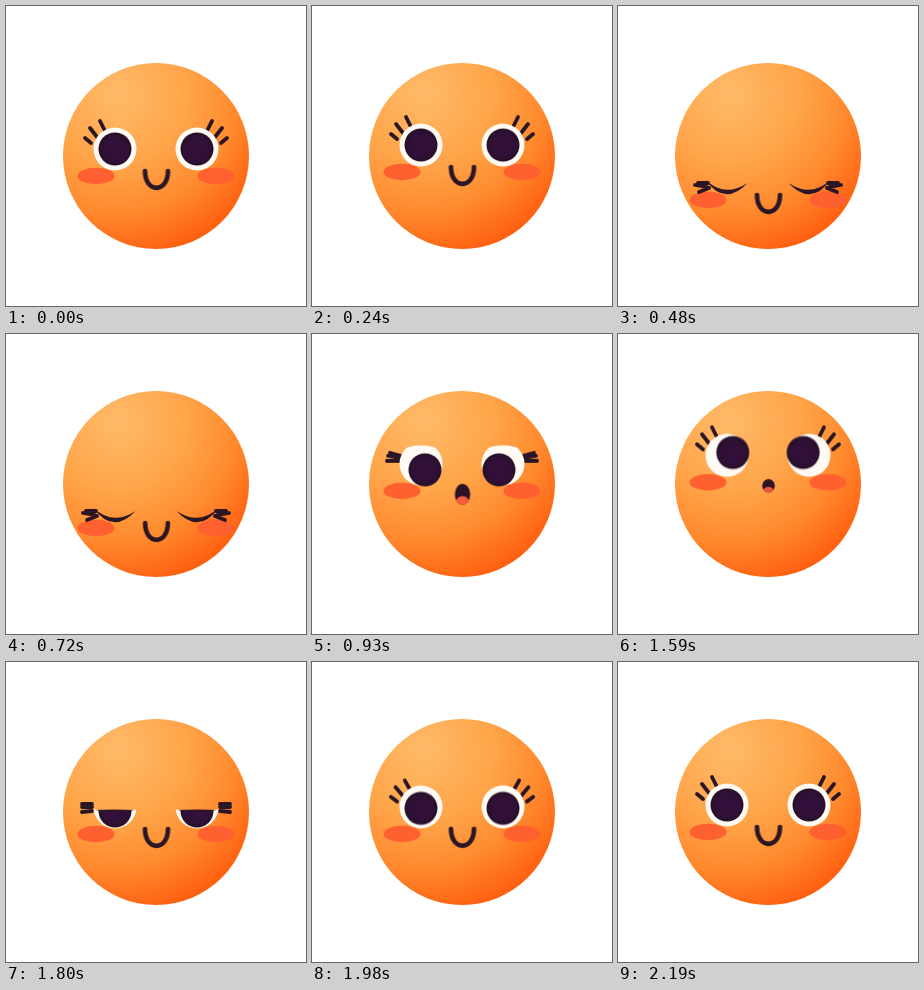
An HTML page that plays this animation: 300 px wide and 300 px high, repeating every 2.22 s.

```html
<!DOCTYPE html>
<html lang="en">
<head>
<meta charset="utf-8">
<title>Blinking orange face</title>
<style>
html, body { margin: 0; height: 100%; overflow: hidden; background: #fff; }
svg { display: block; width: 100vw; height: 100vh; }

.face, .pupil, .edge, .lid, .lash, .smile, .gasp, .tongue {
  animation: 2220ms ease-in-out infinite;
}
.face { animation-name: nod; }
.pupil { animation-name: look; fill: url(#iris); }
.edge { animation-name: blink; }
.lid { animation-name: lid; fill: #2b1626; }
.lash { fill: none; stroke: #2b1626; stroke-width: 3.8; stroke-linecap: round; animation-name: lash; }
.smile { fill: none; stroke: #2b1626; stroke-width: 4.6; stroke-linecap: round; animation-name: smile; }
.gasp { animation-name: gasp; }
.tongue { animation-name: tongue; }

@keyframes nod {
  0%, 100% { transform: translateY(0); }
  10.81% { transform: translateY(-4px); }
  21.62% { transform: translateY(24px); }
  33.8% { transform: translateY(24px); }
  41.89% { transform: translateY(-13px); animation-timing-function: ease-out; }
  47.3% { transform: translateY(-22.5px); }
  70.3% { transform: translateY(-22.5px); }
  81.08% { transform: translateY(2px); }
  87.8% { transform: translateY(2px); }
  95% { transform: translateY(0); }
}

@keyframes look {
  0%, 33.8%, 95%, 100% { transform: translate(0, 0); }
  41.89% { transform: translate(4px, 6px); }
  48% { transform: translate(6px, -3px); }
  70.3% { transform: translate(6px, -3px); }
  81.08% { transform: translate(0, 4px); }
}

/* Visible part of the eye, below the lid */
@keyframes blink {
  0%, 12.5%, 48%, 72%, 91%, 100% { d: path("M-24 -30 Q0 -30 24 -30 V32 H-24 Z"); }
  20.5%, 35.5% { d: path("M-24 12 Q0 44 24 12 V32 H-24 Z"); }
  41.89% { d: path("M-24 -13 Q0 -24 24 -13 V32 H-24 Z"); }
  81.08% { d: path("M-24 2 Q0 6 24 2 V32 H-24 Z"); }
}

@keyframes lid {
  0%, 15%, 48%, 75%, 87%, 100% { d: path("M-21 -8 Q-2 -34 20 -8 Q-2 -36 -21 -8 Z"); opacity: 0; }
  20.5%, 35.5% { d: path("M-21.5 7 Q-2 34 20.5 10 Q-2 25 -21.5 7 Z"); opacity: 1; }
  39.5% { d: path("M-21 -6 Q-2 -10 20 -6 Q-2 -13 -21 -6 Z"); opacity: 0; }
  81.08% { d: path("M-20 3 Q-2 6 20 3 Q-2 2 -20 3 Z"); opacity: 1; }
}

@keyframes lash {
  0%, 12.5%, 48%, 72%, 91%, 100% { d: path("M-30 -11 L-24 -6 M-25 -21 L-18 -12 M-15 -28 L-10 -18"); }
  20.5%, 35.5% { d: path("M-28 19 L-18 15 M-32 12 L-20 14 M-29 10 L-19 10"); }
  41.89% { d: path("M-34 -3 L-21 -3 M-33 -8 L-21 -6 M-31 -11 L-20 -8"); }
  81.08% { d: path("M-33 5 L-23 4 M-33 0 L-23 0 M-33 -3 L-23 -3"); }
}

@keyframes smile {
  0%, 32%, 76%, 100% { transform: scale(1); opacity: 1; }
  36.4% { transform: scale(.5, .8); opacity: 1; }
  37%, 72.5% { transform: scale(.5, .8); opacity: 0; }
  73% { transform: scale(.5, .8); opacity: 1; }
}

@keyframes gasp {
  0%, 36.4%, 73%, 100% { transform: scale(.5, .4); opacity: 0; }
  37% { transform: scale(.5, .45); opacity: 1; }
  41.89% { transform: scale(.73, .88); opacity: 1; }
  48%, 69% { transform: scale(1); opacity: 1; }
  72.5% { transform: scale(.55, .5); opacity: 1; }
}

@keyframes tongue {
  0%, 41.89%, 73%, 100% { fill: #f85c3a; }
  48%, 69% { fill: #b4574f; }
}
</style>
</head>
<body>
<svg viewBox="0 0 300 300">
  <defs>
    <radialGradient id="skin" gradientUnits="userSpaceOnUse" cx="112" cy="88" r="164">
      <stop offset="0" stop-color="#ffba68"/>
      <stop offset=".42" stop-color="#ffa54a"/>
      <stop offset=".72" stop-color="#ff8a2e"/>
      <stop offset="1" stop-color="#ff6010"/>
    </radialGradient>
    <radialGradient id="iris">
      <stop offset="0" stop-color="#38103f"/>
      <stop offset=".75" stop-color="#2f1036"/>
      <stop offset="1" stop-color="#261026"/>
    </radialGradient>
    <clipPath id="open"><path class="edge" d="M-24 -30 Q0 -30 24 -30 V32 H-24 Z"/></clipPath>
    <clipPath id="lips"><ellipse rx="10.5" ry="12"/></clipPath>
  </defs>

  <circle cx="150" cy="150" r="93" fill="url(#skin)"/>

  <g class="face">
    <g id="side">
      <ellipse cx="90" cy="170" rx="18.5" ry="8.2" fill="#ff6030"/>
      <g transform="translate(109 143)">
        <path class="lash" d="M-30 -11 L-24 -6 M-25 -21 L-18 -12 M-15 -28 L-10 -18"/>
        <g clip-path="url(#open)">
          <circle r="21.5" fill="#fffaf3"/>
          <circle class="pupil" r="16.5"/>
        </g>
        <path class="lid" d="M-21 -8 Q-2 -34 20 -8 Q-2 -36 -21 -8 Z"/>
      </g>
    </g>
    <g id="mirror" transform="matrix(-1 0 0 1 300 0)"></g>

    <g transform="translate(150.5 165)">
      <path class="smile" d="M-11.5 0 C-11.5 22.5 11.5 22.5 11.5 0"/>
    </g>
    <g transform="translate(150.5 173.5)">
      <g class="gasp">
        <ellipse rx="10.5" ry="12" fill="#2b1226"/>
        <g clip-path="url(#lips)"><ellipse class="tongue" cy="9" rx="9" ry="7"/></g>
      </g>
    </g>
  </g>
</svg>
<script>
// The right side of the face is the left one mirrored
const side = document.getElementById("side");
document.getElementById("mirror").append(...side.cloneNode(true).children);
</script>
</body>
</html>
```
